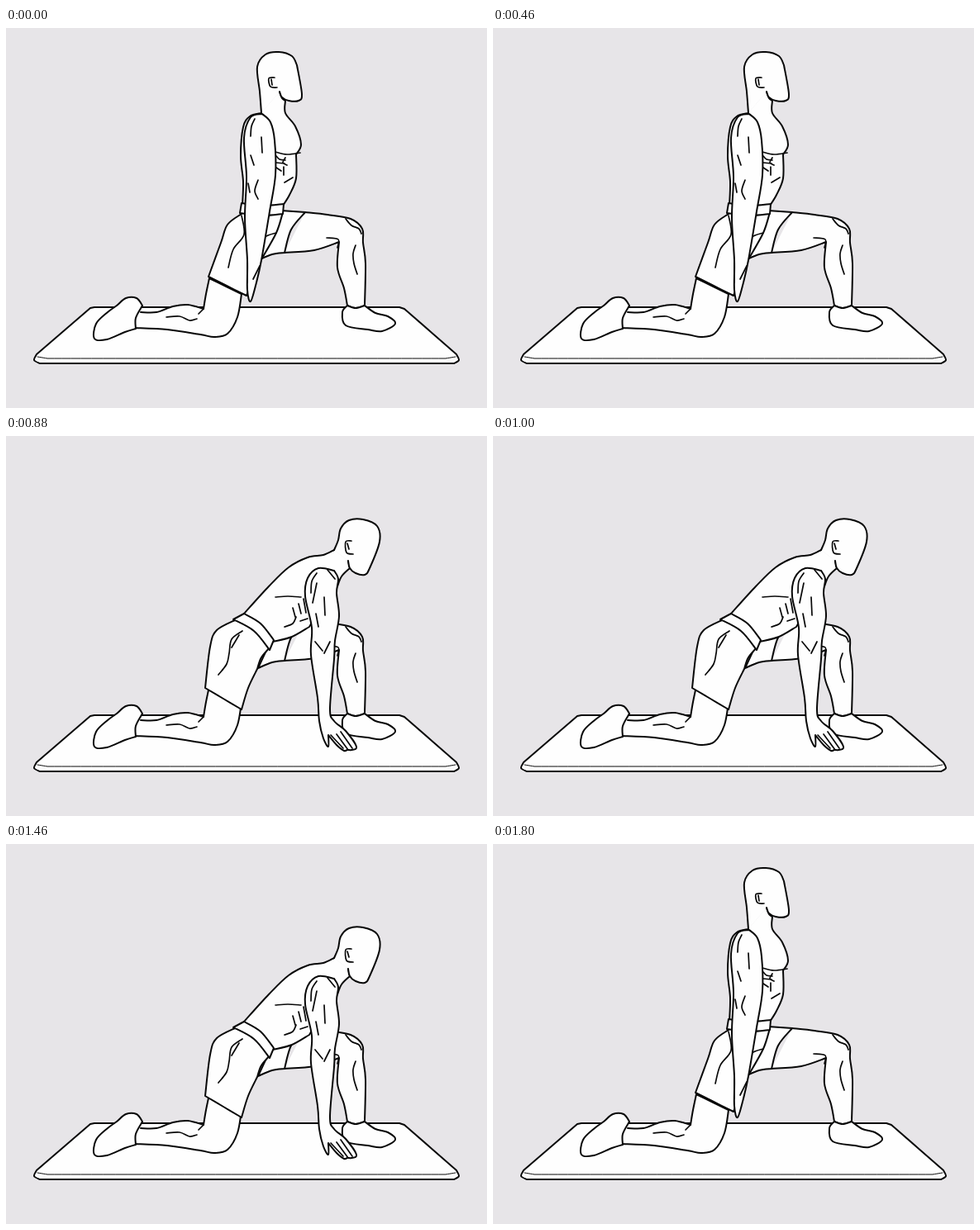
Write an HTML page that moves like this. It is 582 px wide and 460 px high and loops after 1.9 s.

```html
<!DOCTYPE html>
<html lang="en">
<head>
<meta charset="utf-8">
<title>Kneeling lunge stretch</title>
<style>
  html, body { margin: 0; width: 100%; height: 100%; overflow: hidden; background: #e7e5e8; }
  svg { display: block; width: 100%; height: 100%; }
  path { fill: #fefefe; stroke: #080808; stroke-width: 2; stroke-linecap: round; stroke-linejoin: round; }
  .line { fill: none; stroke-width: 1.7; }
  .fine { fill: none; stroke-width: 1; }
  .upright, .bent { animation: show-upright 1900ms step-end infinite; }
  .bent { animation-name: show-bent; }
  /* Upright until 700 ms, bent until 1700 ms, then upright again. */
  @keyframes show-upright { 0% { opacity: 1 } 36.842% { opacity: 0 } 89.473% { opacity: 1 } }
  @keyframes show-bent { 0% { opacity: 0 } 36.842% { opacity: 1 } 89.473% { opacity: 0 } }
</style>
</head>
<body>
<svg viewBox="0 0 582 460" role="img" aria-label="A man alternates between an upright and a bent lunge on a mat">
  <g class="mat">
    <path data-curve="102,339! 107,338! 476,338! 482,340! 545,395! 548,402 542,406! 41,406! 34,402 37,395! 102,339"/>
    <path class="fine" data-curve="38,398 50,400! 532,400! 544,398"/>
  </g>

  <g class="back-leg">
    <path data-curve="163,344 182,344 202,337 220,335 239,340! 242,322 246,303! 285,322! 280,350 268,370 252,374 235,371 195,365 155,363"/>
    <path class="line" data-curve="239,340 233,346 / 194,350 210,349 222,354 231,352"/>
    <path data-curve="165,336! 158,327 145,327 134,336 123,344 109,358 107,376 122,377 144,368 157,364! 157,351 165,336!"/>
  </g>

  <g class="front-leg">
    <path data-curve="362,223 389,226 417,231 431,243 432,260 435,285 434,336! 423,339 413,336! 409,315 401,290 403,259! 373,269 337,272"/>
    <path data-curve="413,336! 407,344 411,360 438,365 455,367 471,358 462,349 447,345 434,336! 423,339 413,336!"/>
    <path class="line" data-curve="411,231 418,239 427,243 430,249 / 423,263 420,273 421,285 425,298 / 388,254 402,256 401,266"/>
    <path data-curve="333,221! 362,223! 345,244 337,272! 322,274 305,281! 333,221"/>
  </g>

  <g class="upright">
    <path data-curve="285,225 268,238 260,260 245,301! 265,311 291,324! 309,280! 327,248 335,223"/>
    <path class="line" data-curve="285,227 288,250 275,268 269,290 / 308,256 317,251 327,248"/>

    <path data-curve="331,77 334,85 338,88! 338,103 350,119 357,141 351,153! 351,182 343,202 335,215! 286,215! 287,186 284,155 287,120 295,107 309,103"/>
    <path data-curve="285,212! 310,215 336,213! 335,225! 310,227 283,224! 285,212!"/>
    <path data-curve="309,103 307,77 304,47 314,32 330,29 346,34 352,45! 358,80 354,88 342,88 334,84 331,77"/>
    <path class="line" data-curve="325,60 318,61 320,71 328,72 / 321,62 322,69"/>
    <path class="line" data-curve="326,150 340,153 356,151 / 327,155 331,159 338,160 / 327,163 337,164 / 327,169 333,173 / 338,157 335,163 340,166 / 336,168 336,178 / 347,181 337,187 / 319,211 323,194"/>

    <path data-curve="310,104 296,108 288,133 291,180 289,230 292,281 292,317 296,331 303,308 309,281 319,222 326,178 325,136 320,114 310,104"/>
    <path class="line" data-curve="301,110 297,119 296,131 / 309,132 310,151 / 296,154 300,166 / 305,184 301,197 305,207 / 293,188 295,199 / 292,284 292,308 / 307,288 299,304"/>
  </g>

  <g class="bent">
    <path data-curve="397,138 384,144 365,147 342,159 318,182 288,215! 323,249! 346,243 367,231! 385,200! 401,182! 406,170 416,160! 414,151"/>
    <path data-curve="279,222 255,235 247,255 241,305! 263,318 285,331! 293,305 304,282! 309,268 321,254"/>
    <path data-curve="288,215! 308,227 324,247! 319,259! 300,236 275,222! 288,215!"/>
    <path class="line" data-curve="286,236 273,246 270,263 267,276 257,289 / 282,241 273,256"/>

    <path data-curve="397,138 402,126 405,112 415,102 432,101 449,109 452,128 440,160 434,168 423,166 416,160 414,151"/>
    <path class="line" data-curve="418,127 411,128 412,141 420,143 / 413,130 415,137"/>
    <path class="line" data-curve="326,195 341,194 357,195 / 337,231 347,227 351,219 / 347,208 350,219 / 354,203 357,215 / 360,197 363,214 / 356,224 365,221"/>

    <path data-curve="397,163 378,160 365,172 362,194 370,232 369,265 377,317 379,345 384,366 390,376 390,362! 400,374 409,381 413,380 418,380 424,376 411,357 397,345 392,330 397,270 398,248 403,218 400,190 402,173 397,163"/>
    <path class="line" data-curve="376,166 370,176 369,190 / 389,162 398,173 / 376,178 371,202 / 385,195 386,217 / 375,215 378,231 / 374,249 383,260 / 392,249 385,263 / 393,362 408,378 / 400,361 414,380 / 405,358 419,378"/>
  </g>
</svg>
<script>
  // Points are joined smoothly; "!" marks a corner and "/" starts a new stroke.
  const parsePoint = text => {
    const [x, y] = text.split(',').map(parseFloat);
    return { x, y, corner: text.endsWith('!') };
  };

  function smoothStroke(text) {
    const points = text.trim().split(/\s+/).map(parsePoint);
    return points.map((end, i) => {
      if (!i) return `M${end.x} ${end.y}`;
      const start = points[i - 1];
      const before = start.corner ? start : points[i - 2] || start;
      const after = end.corner ? end : points[i + 1] || end;
      const handle = (p, from, to) => `${p.x + (to.x - from.x) / 6} ${p.y + (to.y - from.y) / 6}`;
      return `C${handle(start, before, end)} ${handle(end, after, start)} ${end.x} ${end.y}`;
    }).join('');
  }

  for (const path of document.querySelectorAll('[data-curve]')) {
    path.setAttribute('d', path.dataset.curve.split('/').map(smoothStroke).join(''));
  }
</script>
</body>
</html>
```
